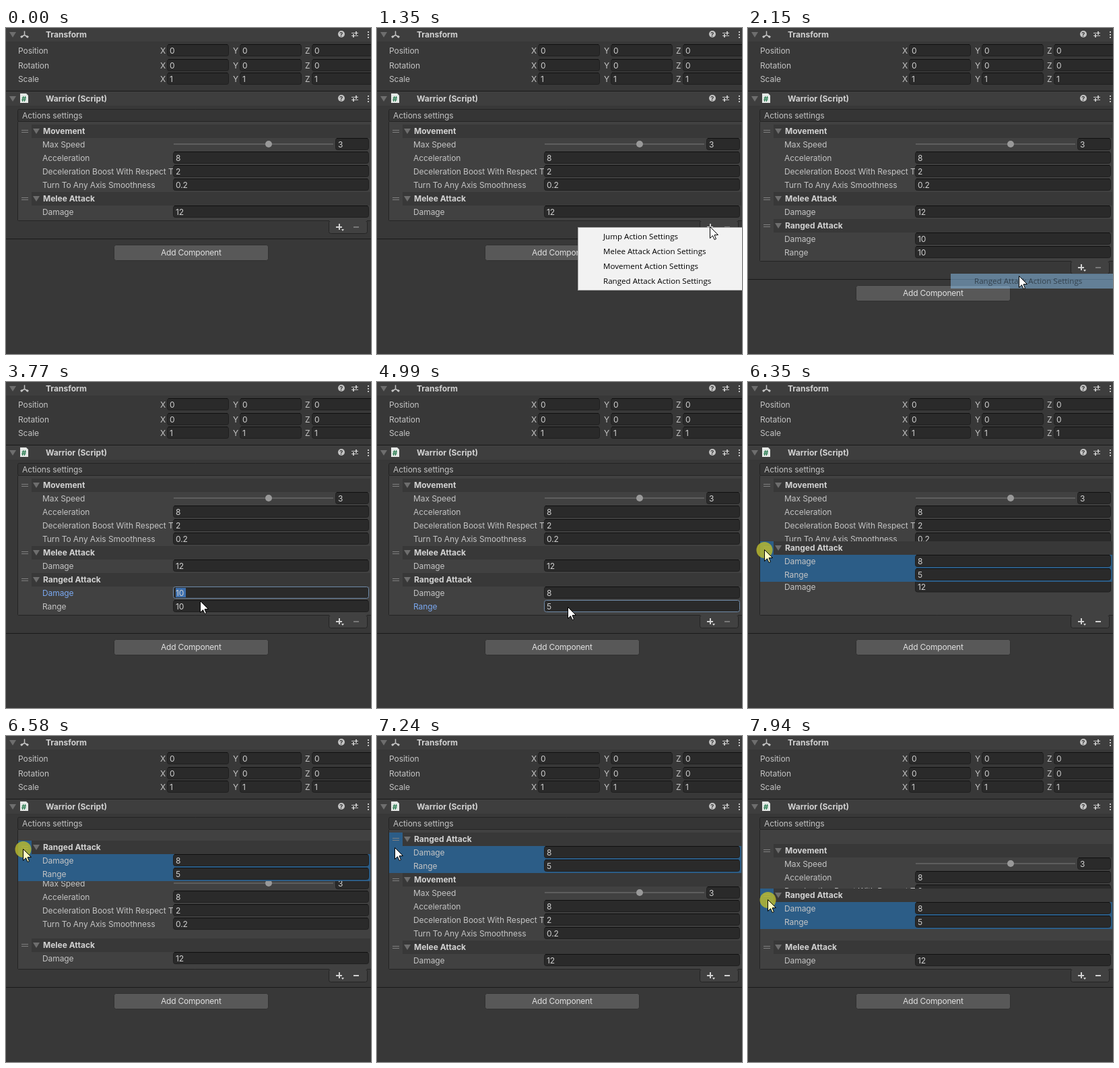
Recreate the animation shown at these times as an HTML page with a canvas. Size 542 by 483 pixels, loop 7990 ms.

```html
<!DOCTYPE html>
<html lang="en">
<head>
<meta charset="utf-8">
<title>Inspector list</title>
<style>
html, body { margin: 0; width: 542px; height: 483px; overflow: hidden; background: #383838; }
canvas { display: block; }
</style>
</head>
<body>
<canvas id="stage" width="542" height="483"></canvas>
<script>
const c = document.getElementById('stage').getContext('2d');
const LOOP = 7990, ROW = 20, SHIFT = 60, TOP = 143;
const TEXT = '#c4c4c4', BRIGHT = '#d2d2d2', BLUE = '#2c5d87', PANEL = '#414141', EDGE = '#242424';
const MENU = ['Jump', 'Melee Attack', 'Movement', 'Ranged Attack'];

// Moments of the story, in ms
const ENTER = 280, OPEN = 950, ADD = 2100, EDIT_DAMAGE = 2750, TYPE_DAMAGE = 3870,
  EDIT_RANGE = 4420, TYPE_RANGE = 4760, GRAB = 5500, DROP = 7090, REGRAB = 7430;
const CLICKS = [930, 2010, 2710, 4400];

const smooth = k => k * k * (3 - 2 * k);
const easeOut = k => k * (2 - k);
const power = n => k => k ** n;

// Each move leads the cursor from where it rests to x, y
const MOVES = [
  { from: ENTER, to: 790, x: 495, y: 295 },
  { from: 1350, to: 1820, x: 403, y: 368 },
  { from: 2170, to: 2570, x: 284, y: 316 },
  { from: 3730, to: 3960, x: 298, y: 343, ease: easeOut },
  { from: 4100, to: 4400, x: 288, y: 335 },
  { from: 4950, to: 5480, x: 25, y: 296 },
  { from: 5690, to: 6580, x: 26, y: 168, ease: power(3.4) },
  { from: 6600, to: 7050, x: 27, y: 166 },
  { from: 7250, to: 7290, x: 28, y: 160 },
  { from: REGRAB, to: 7940, x: 30, y: 243, ease: power(2) }
];

const within = (t, a, b) => t >= a && t < b;
const slide = (t, start) => t < start ? 0 : SHIFT * (1 - Math.exp((start - t) / 100));

function cursorAt(t) {
  let x = 500, y = 441;
  for (const m of MOVES) {
    if (t < m.from) break;
    const k = (m.ease || smooth)(Math.min(1, (t - m.from) / (m.to - m.from)));
    x += (m.x - x) * k;
    y += (m.y - y) * k;
  }
  return [Math.round(x), Math.round(y)];
}

function rect(x, y, w, h, color) {
  c.fillStyle = color;
  c.fillRect(x, y, w, h);
}

function box(x, y, w, h, fill, stroke, r = 2) {
  c.beginPath();
  c.roundRect(x + .5, y + .5, w - 1, h - 1, r);
  c.fillStyle = fill;
  c.fill();
  c.strokeStyle = stroke;
  c.lineWidth = 1;
  c.stroke();
}

function disc(x, y, r, color) {
  c.beginPath();
  c.arc(x, y, r, 0, 7);
  c.fillStyle = color;
  c.fill();
}

function poly(points, fill, stroke) {
  c.beginPath();
  points.forEach(([x, y]) => c.lineTo(x, y));
  c.closePath();
  c.fillStyle = fill;
  c.fill();
  if (stroke) {
    c.strokeStyle = stroke;
    c.lineWidth = 1;
    c.stroke();
  }
}

// Text vertically centred on y
function text(s, x, y, color = TEXT, font = '12px Inter, sans-serif', spacing = '-0.08px') {
  c.font = font;
  c.letterSpacing = spacing;
  c.fillStyle = color;
  c.fillText(s, x, y + 4);
}
const bold = (s, x, y) => text(s, x, y, BRIGHT, '700 12px Inter, sans-serif', '0px');
const arrow = (x, y) => poly([[x - 5, y - 4], [x + 5, y - 4], [x, y + 4]], '#6e6e6e');

function field(x, y, w, value, focused, selected) {
  box(x - 1, y - 10, w, 18, '#2a2a2a', focused ? '#6f8aa8' : '#1f1f1f', 3);
  if (!focused) rect(x + 1, y - 10, w - 4, 1, '#101010');
  if (selected) rect(x + 3, y - 8, 15, 14, '#3d6fae');
  text(value, x + 3, y, BRIGHT);
}

function componentHeader(title, y) {
  rect(0, y - 11, 542, 21, '#3e3e3e');
  arrow(10, y);
  bold(title, 59, y);
  disc(498, y - 1, 5, TEXT);
  text('?', 495.3, y - 1, '#383838', '700 9px Inter, sans-serif');
  for (const side of [0, 1]) {
    rect(513, y - 3 + side * 4, 10, 1, TEXT);
    rect(519 - side * 4, y - 5 + side * 4, 2, 5, TEXT);
  }
  for (const d of [-4, 0, 4]) rect(537, y + d - 1, 2, 2, TEXT);
}

function transform() {
  componentHeader('Transform', 10);
  for (let i = 0; i < 3; i++) {
    c.save();
    c.translate(27.5, 10.5);
    c.rotate(i * Math.PI * 2 / 3);
    rect(-.75, -6, 1.5, 6, TEXT);
    if (i) rect(-1.5, -6.5, 3, 3, TEXT);
    c.restore();
  }
  [['Position', 34, '0'], ['Rotation', 56, '0'], ['Scale', 76, '1']].forEach(([name, y, value]) => {
    text(name, 18, y);
    [...'XYZ'].forEach((axis, i) => {
      const x = Math.round(240 + i * 107.5);
      text(axis, x - 11, y);
      field(x, y, 92, value);
    });
  });
}

function scriptHeader() {
  componentHeader('Warrior (Script)', 105);
  rect(0, 93, 542, 1, '#1a1a1a');
  poly([[21, 97], [30, 97], [33, 100], [33, 111], [21, 111]], '#e6e9e7');
  text('#', 23, 104.5, '#23784c', '700 11px Inter, sans-serif');
}

function element(y, title, rows, active) {
  if (active) rect(18, y, 523, ROW * (rows.length + 1), BLUE);
  rect(38, y, 503, ROW, '#383838');
  for (const d of [8, 11]) rect(23, y + d, 10, 1, '#808080');
  arrow(45, y + 10);
  bold(title, 55, y + 10);
  rows.forEach(([name, value, state], i) => {
    const mid = y + 30 + i * ROW;
    c.save();
    c.beginPath();
    c.rect(54, mid - 10, 194, ROW);
    c.clip();
    text(name, 54, mid, state ? '#7aa8f0' : TEXT);
    c.restore();
    if (name === 'Max Speed') {
      rect(249, mid - 2, 237, 2, '#5e5e5e');
      disc(390, mid - 1, 5, '#999');
      field(490, mid, 50, value);
    } else field(249, mid, 291, value, state, state === 'all');
  });
}

// A number field that is focused, selected, retyped and left again
function edited(name, before, after, t, focus, typed, blur) {
  const state = within(t, focus, blur) && (t < typed ? 'all' : 'edit');
  return [name, t < typed ? before : after, state];
}

function elements(t, cursorY) {
  let ranged = TOP + 140;
  if (t >= REGRAB) ranged = TOP + cursorY - 160;
  else if (t >= DROP) ranged = TOP;
  else if (t >= GRAB) ranged += cursorY - 296;

  element(TOP + slide(t, 6435) - slide(t, 7815), 'Movement', [
    ['Max Speed', '3'], ['Acceleration', '8'],
    ['Deceleration Boost With Respect To', '2'], ['Turn To Any Axis Smoothness', '0.2']
  ]);
  element(TOP + 100 + slide(t, 6280), 'Melee Attack', [['Damage', '12']]);
  if (t >= ADD) element(ranged, 'Ranged Attack', [
    edited('Damage', '10', '8', t, EDIT_DAMAGE, TYPE_DAMAGE, EDIT_RANGE),
    edited('Range', '10', '5', t, EDIT_RANGE, TYPE_RANGE, GRAB)
  ], t >= GRAB);
}

function list(t, cursorY) {
  const bottom = t >= ADD ? 286 + SHIFT : 286;
  box(17, 138, 530, bottom - 138, PANEL, EDGE, 1);
  box(17, 120, 530, 19, '#353535', EDGE);
  text('Actions settings', 24, 130);
  c.save();
  c.beginPath();
  c.rect(18, 139, 524, bottom - 140);
  c.clip();
  elements(t, cursorY);
  c.restore();

  box(479, bottom - 1, 58, 20, PANEL, EDGE, 3);
  rect(480, bottom - 1, 56, 1, PANEL);
  const mid = bottom + 9;
  rect(490, mid - 1, 9, 2, BRIGHT);
  rect(494, mid - 5, 2, 9, BRIGHT);
  poly([[498, mid + 3], [502, mid + 3], [500, mid + 6]], BRIGHT);
  rect(516, mid - 1, 8, 2, t >= GRAB ? BRIGHT : '#787878');

  rect(0, bottom + 26, 542, 1, '#1a1a1a');
  box(160, bottom + 35, 230, 24, '#585858', '#303030', 3);
  text('Add Component', 230, bottom + 47, '#e0e0e0', undefined, '-0.22px');
}

function menuItem(i, hot) {
  const y = 298 + i * 22;
  if (hot) rect(301, y, 241, 22, '#91c9f7');
  text(MENU[i] + ' Action Settings', 336, y + 11, '#000', '11.6px "Open Sans", sans-serif', '0px');
}

function menu(t, cursorY) {
  if (within(t, OPEN, ADD)) {
    c.globalAlpha = Math.min(1, (t - OPEN) / 100);
    rect(298, 295, 244, 94, '#a0a0a0');
    rect(299, 296, 243, 92, '#f2f2f2');
    const hot = Math.floor((cursorY - 298) / 22);
    MENU.forEach((_, i) => menuItem(i, i === hot));
  } else if (within(t, ADD, ADD + 140)) {
    c.globalAlpha = .78 * (1 - (t - ADD) / 140);
    menuItem(3, true);
  }
  c.globalAlpha = 1;
}

function pointer(t, x, y) {
  const pressed = CLICKS.some(start => within(t, start, start + 100))
    || within(t, GRAB, DROP) || t >= REGRAB;
  if (pressed) disc(x - .5, y, 12, 'rgba(190,190,45,.8)');
  const shape = [[0, 0], [0, 17], [4, 13.2], [6.6, 19], [9, 18], [6.5, 12.2], [12, 12]];
  poly(shape.map(([dx, dy]) => [x + dx - .5, y + dy - .5]), pressed ? '#ffffc4' : '#fff', '#000');
}

function draw(t) {
  rect(0, 0, 542, 483, '#383838');
  transform();
  scriptHeader();
  const [x, y] = cursorAt(t);
  list(t, y);
  menu(t, y);
  if (t >= ENTER) pointer(t, x, y);
}

const start = performance.now();
function tick() {
  draw((performance.now() - start) % LOOP);
  requestAnimationFrame(tick);
}
tick();
</script>
</body>
</html>
```
